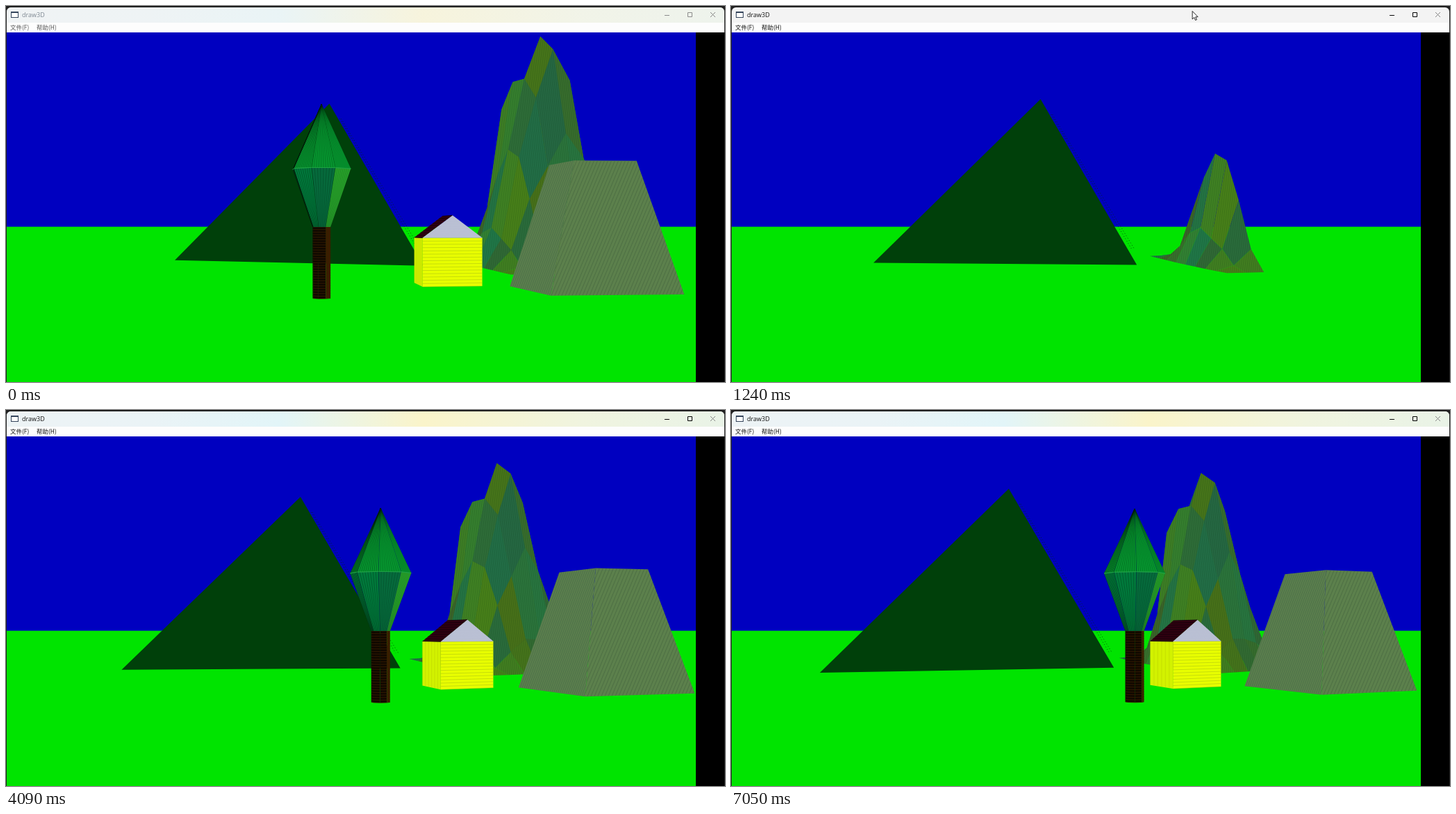
Animation, 1035 px wide and 541 px high, one loop 8 s. Source, as an HTML page with a canvas:

```html
<!DOCTYPE html>
<html lang="zh">
<head>
<meta charset="utf-8">
<style>
html, body { margin: 0; width: 100%; height: 100%; overflow: hidden; background: #000; }
canvas { display: block; }
</style>
</head>
<body>
<canvas id="stage" width="1035" height="541"></canvas>
<script>
const c = document.getElementById('stage').getContext('2d');
const LOOP = 8000, TOP = 38, HORIZON = 317.6, GROUND = -102;
const clamp = v => Math.max(0, Math.min(1, v));
const mix = (a, b, k) => a + (b - a) * k;
const noise = (i, j) => Math.abs(Math.sin(i * 12.9898 + j * 78.233 + 4.1) * 43758.5453) % 1;

// The scene turns 0.1 rad per view; scale grows evenly towards the viewer.
// Points are x, height above eye level, z; all three are world units.
let turn = 0;
function project([x, h, z]) {
  const cos = Math.cos(turn), sin = Math.sin(turn);
  const scale = 0.72 + 0.00067 * (z * cos - x * sin);
  return [497 + scale * (x * cos + z * sin), 318 - scale * h];
}

function path(points) {
  c.beginPath();
  points.forEach(p => c.lineTo(...p));
  c.closePath();
}
function poly(points, color) {
  path(points);
  c.fillStyle = color;
  c.fill();
}
// n lines that join edge a-b to edge d-e
function ruled(a, b, d, e, n, color, width = 0.8) {
  c.beginPath();
  for (let i = 0; i <= n; i++) {
    c.moveTo(mix(a[0], b[0], i / n), mix(a[1], b[1], i / n));
    c.lineTo(mix(d[0], e[0], i / n), mix(d[1], e[1], i / n));
  }
  c.strokeStyle = color;
  c.lineWidth = width;
  c.stroke();
}
function slanted(points, lean, gap, color) {
  c.save();
  path(points);
  c.clip();
  c.beginPath();
  for (let x = 500; x < 1250; x += gap) {
    c.moveTo(x, 0);
    c.lineTo(x - lean * 541, 541);
  }
  c.strokeStyle = color;
  c.lineWidth = 1;
  c.stroke();
  c.restore();
}
// Show a drawing from left to right as far as progress k
function reveal(k, points, draw) {
  if (k <= 0) return;
  const xs = points.map(p => p[0]), left = Math.min(...xs) - 1, right = Math.max(...xs) + 1;
  c.save();
  c.beginPath();
  c.rect(left, 0, (right - left) * clamp(k), 541);
  c.clip();
  draw();
  c.restore();
}

function pyramid(k) {
  const p = [[-592, GROUND, -290], [-211, 640, -636], [149, GROUND, -284]].map(project);
  reveal(k, p, () => poly(p, '#00400a'));
  if (k < 1) return;
  const [, top, end] = p;
  c.setLineDash([1, 3]);
  ruled([top[0] + 15, top[1] + 22], [top[0] + 17, top[1] + 22], [end[0] - 7, end[1] - 22], [end[0] - 3, end[1] - 22], 1, '#00300a');
  c.setLineDash([]);
}

// Square height field, drawn row by row across its width
const CELLS = 8, CELL = 46;
function peak(i, j) {
  const u = i - CELLS / 2, w = j - CELLS / 2;
  const bell = (Math.cos(u * Math.PI / 8) * Math.cos(w * Math.PI / 8)) ** 2;
  const spike = 180 * Math.exp(-4 * ((u + 1) ** 2 + (w + 2) ** 2));
  const rough = u || w ? 0.86 + 0.28 * noise(i, j) : 1;
  return [460 + CELL * (0.968 * u + 0.25 * w), GROUND + 612 * bell * rough + spike, -345 + CELL * (0.968 * w - 0.25 * u)];
}
function mountain(k) {
  const rows = Math.ceil(clamp(k) * CELLS);
  for (let j = 0; j < CELLS; j++) {
    for (let i = rows - 1; i >= 0; i--) {
      const quad = [[i, j], [i + 1, j], [i + 1, j + 1], [i, j + 1]].map(p => project(peak(...p)));
      const a = noise(i + 20, j), b = noise(i, j + 40);
      poly(quad, `rgb(${mix(32, 72, a)},${mix(98, 128, b)},${mix(72, 24, a)})`);
      slanted(quad, 0.12, 3, '#00301022');
    }
  }
}

function house(k) {
  const at = (u, w, h) => project([148 + 101 * u - 19 * w, h, 165 - 32 * u - 83 * w]);
  const [left, front, right] = [at(0, 1, GROUND), at(0, 0, GROUND), at(1, 0, GROUND)];
  const [eaveL, eaveF, eaveR] = [at(0, 1, -19), at(0, 0, -18.5), at(1, 0, -18.5)];
  const back = at(0.5, 1, 20), ridge = at(0.5, 0, 20);
  reveal(k, [left, right], () => {
    poly([left, front, eaveF, eaveL], '#d2f200');
    ruled(left, front, eaveL, eaveF, 6, '#a9b90066');
    poly([front, right, eaveR, eaveF], '#e8ff00');
    ruled(front, eaveF, right, eaveR, 15, '#a3b51599');
    poly([eaveL, eaveF, ridge, back], '#300010');
    ruled(eaveL, back, eaveF, ridge, 9, '#12000a');
    poly([eaveF, eaveR, ridge], '#bdc3d6');
    ruled(eaveF, ridge, eaveR, ridge, 14, '#a3aac266');
  });
}

function block(k) {
  const base = [[296, GROUND, 130], [349, GROUND, 322], [550, GROUND, 265]].map(project);
  const top = [[358, 103, 165], [388, 103, 257], [485, 103, 235]].map(project);
  const left = [base[0], base[1], top[1], top[0]], front = [base[1], base[2], top[2], top[1]];
  reveal(k, base, () => {
    poly(left, '#5b7f4d');
    slanted(left, 0.36, 3, '#47684899');
    poly(front, '#5c804c');
    slanted(front, 0.42, 5, '#44633f99');
  });
}

// Eight-sided tree; only faces that look at the viewer are drawn
function tree(trunkShown, crownShown) {
  const at = (k, r, h) => {
    const a = (45 * k + 53.5) * Math.PI / 180;
    return project([21 + r * Math.cos(a), h, 424 + r * Math.sin(a)]);
  };
  const tip = at(0, 0, 176), span = [[tip[0] - 45, 0], [tip[0] + 45, 0]];
  const faces = draw => {
    for (let k = 0; k < 8; k++) {
      const a = at(k + 1, 44, 83), b = at(k, 44, 83);
      if (a[0] < b[0]) draw(k, a, b, ((a[0] + b[0]) / 2 - tip[0]) / 44);
    }
  };
  reveal(trunkShown, span, () => faces((k, a, b, side) => {
    const quad = [at(k + 1, 13.5, 0), at(k, 13.5, 0), at(k, 13.5, GROUND), at(k + 1, 13.5, GROUND)];
    poly(quad, side > 0.5 ? '#3a1e00' : '#100800');
    ruled(quad[0], quad[3], quad[1], quad[2], 28, '#3c2000');
  }));
  reveal(crownShown, span, () => faces((k, a, b, side) => {
    const low = [at(k, 13.5, 0), at(k + 1, 13.5, 0)];
    const dark = `rgba(0,30,10,${mix(0.5, 0.15, (side + 1) / 2)})`;
    poly([tip, a, b], '#06962f');
    ruled(tip, tip, a, b, 10, dark);
    poly([a, b, ...low], side > 0.5 ? '#27a12a' : side > 0 ? '#066a3c' : '#007a3c');
    ruled(a, b, low[1], low[0], 8, dark);
    ruled(a, a, b, b, 1, '#20a545');
  }));
}

// Redraws: time of clearing, time the mountain begins, view
const passes = [[-9000, -9000, 0], [350, 370, 1], [1170, 1180, 1], [3110, 3380, 2], [6400, 6380, 3]];
function scene(t) {
  const [start, begin, view] = passes.filter(p => t >= p[0]).pop();
  const e = t - begin;
  turn = (view - 1.5) * 0.1;
  c.save();
  c.beginPath();
  c.rect(1, TOP, 992, 541);
  c.clip();
  c.fillStyle = '#0000c0';
  c.fillRect(0, TOP, 1035, 541);
  c.fillStyle = '#00e400';
  c.fillRect(0, HORIZON, 1035, 541);
  pyramid((t - start) / Math.max(1, begin - start));
  mountain(e / 260);
  house((e - 260) / 55);
  block((e - 330) / 150);
  tree((e - 490) / 50, (e - 540) / 120);
  c.restore();
  c.fillStyle = '#000';
  c.fillRect(993, TOP, 41, 541);
}

function titleBar(t) {
  const active = t >= 1170;
  const tint = t < 70 ? 0.55 : t < 130 ? 0.25 : t < 1980 ? 0 : t < 2110 ? 0.5 : 1;
  c.fillStyle = '#202020';
  c.fillRect(0, 0, 1035, 541);
  c.fillStyle = '#f3f3f3';
  c.beginPath();
  c.roundRect(1, 2, 1033, 30, 6);
  c.fill();
  const g = c.createLinearGradient(0, 0, 1035, 0);
  [[0, '#edf3f5'], [0.2, '#eaf3f6'], [0.38, '#e2f5f8'], [0.58, '#faf4ca'], [0.8, '#f0f4df'], [1, '#e9f3e7']]
    .forEach(s => g.addColorStop(...s));
  c.globalAlpha = tint;
  c.fillStyle = g;
  c.fill();
  c.globalAlpha = 1;
  c.fillStyle = '#fdfdfd';
  c.fillRect(1, 24, 1033, 14);

  c.fillStyle = '#fff';
  c.fillRect(7, 8, 11, 9);
  c.strokeStyle = c.fillStyle = '#35455c';
  c.lineWidth = 1;
  c.strokeRect(7.5, 8.5, 10, 8);
  c.fillRect(7, 8, 11, 2);

  c.fillStyle = active ? '#111' : '#7d8791';
  c.font = '9px "Open Sans", sans-serif';
  c.fillText('draw3D', 23, 16);
  c.fillStyle = active ? '#111' : '#555';
  c.font = '8.5px "Noto Sans CJK SC", "Noto Sans CJK", sans-serif';
  c.fillText('文件(F)', 6, 34);
  c.fillText('帮助(H)', 44, 34);

  c.strokeStyle = active ? '#000' : '#8b8b8b';
  c.beginPath();
  c.moveTo(948, 13.5);
  c.lineTo(955, 13.5);
  c.rect(981.5, 9.5, 6, 6);
  c.stroke();
  c.strokeStyle = '#858585';
  c.beginPath();
  c.moveTo(1014, 9); c.lineTo(1021, 16);
  c.moveTo(1021, 9); c.lineTo(1014, 16);
  c.stroke();
}

function cursor(t) {
  if (t < 350 || t >= 3110) return;
  const left = 1 - clamp((t - 350) / 340), slide = clamp((t - 1170) / 330);
  const x = 685 + 325 * left ** 1.3 - 97 * slide, y = 7 + 482 * left ** 4 + 2 * slide;
  if (t >= 2370 && t < 2850) {
    c.fillStyle = '#f8ee48e0';
    c.beginPath();
    c.arc(x, 9, 8.5, 0, 7);
    c.fill();
  }
  const arrow = [[0, 0], [0, 11.5], [2.7, 9], [4.4, 13], [6.3, 12.2], [4.6, 8.4], [8, 8.2]];
  poly(arrow.map(p => [p[0] + x, p[1] + y]), '#fff');
  c.strokeStyle = '#111';
  c.lineWidth = 0.9;
  c.stroke();
}

function frame(now) {
  const t = now % LOOP;
  titleBar(t);
  scene(t);
  cursor(t);
  requestAnimationFrame(frame);
}
requestAnimationFrame(frame);
</script>
</body>
</html>
```
